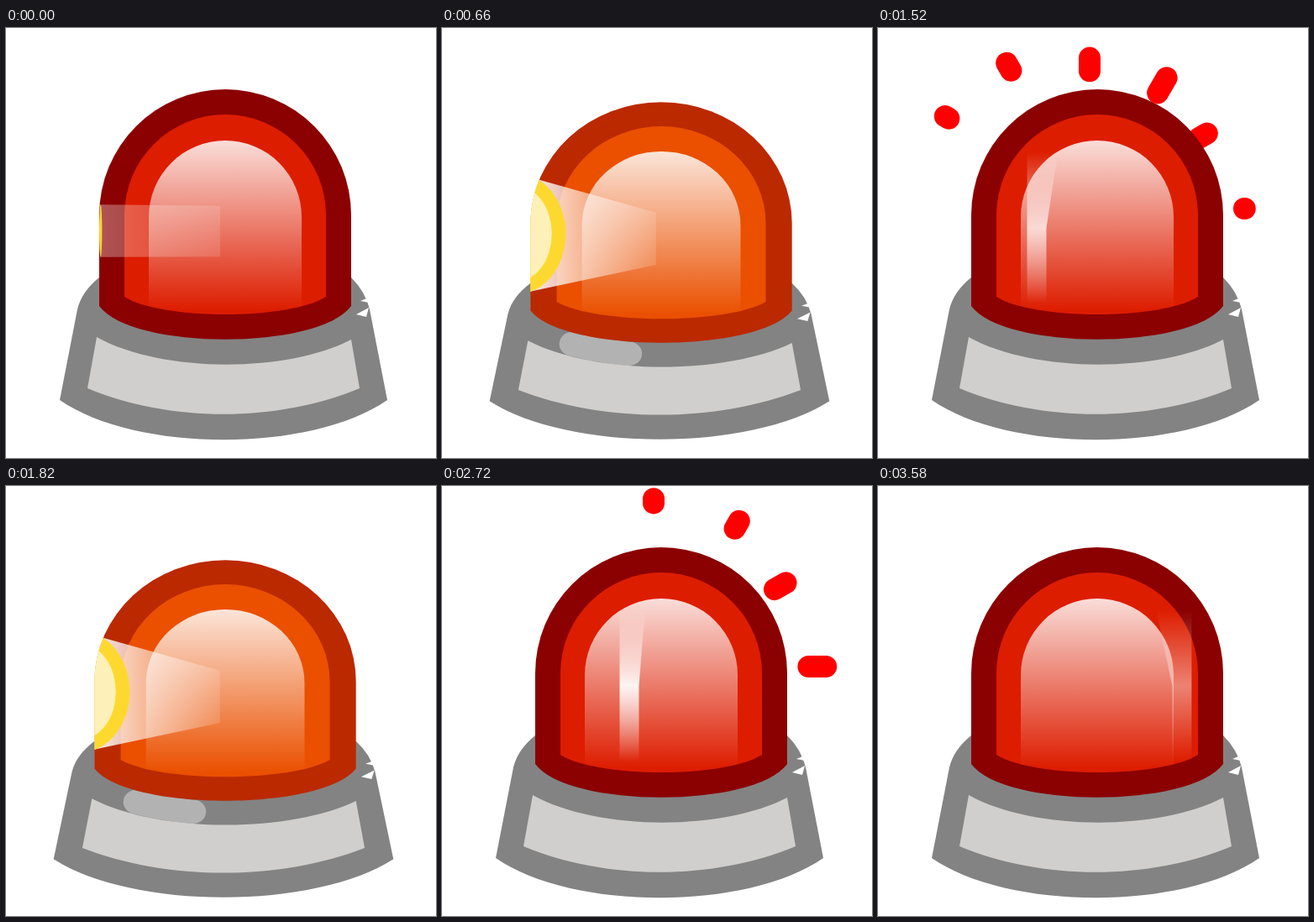
Write an HTML page with a canvas that moves like this. It is 512 px wide and 512 px high and loops after 3.6 s.

```html
<!DOCTYPE html>
<html>
<head>
<meta charset="utf-8">
<style>
  html, body { margin: 0; overflow: hidden; background: #fff; }
  canvas { display: block; }
</style>
</head>
<body>
<canvas id="stage" width="512" height="512"></canvas>
<script>
const ctx = document.getElementById('stage').getContext('2d');
const TURN = 29, LAST = 5, FRAMES = 180, FRAME_MS = 20;

const base = new Path2D('M111 297Q90 314 85 335L64 443C155 506 363 506 454 443L433 335Q428 314 411 297Z');
const plate = new Path2D('M108 368C185 411 334 411 411 371L421 429C323 470 195 470 97 429Z');
const chips = new Path2D('M417 341L432 333L429 344ZM422 325L429 322L432 327Z');
const glass = new Path2D('M111 331V223A150 150 0 0 1 411 223V331C372 384 150 384 111 331Z');
const body = new Path2D('M141 320V223A120 120 0 0 1 381 223V320C337 348 185 348 141 320Z');
const core = new Path2D('M170 332V225A91 91 0 0 1 352 225V332C300 344 222 344 170 332Z');

// End point and direction of each ray, from left to right
const rightRays = [[364, 24, .5, -.866], [436, 100, .866, -.5], [498, 215, 1, 0]];
const leftRays = rightRays.map(([x, y, dx, dy]) => [507 - x, y, -dx, dy]).reverse();
const rays = [...leftRays, [252, 5, 0, -1], ...rightRays];

const clamp = v => Math.max(0, Math.min(1, v));
const smooth = v => { v = clamp(v); return v * v * (3 - 2 * v); };
const white = a => `rgba(255,255,255,${a})`;
const blend = (a, b, t) => `rgb(${a.map((v, i) => Math.round(v + (b[i] - v) * t))})`;

function fill(path, style) {
  ctx.fillStyle = style;
  ctx.fill(path);
}

function gradient(x0, y0, x1, y1, ...alphas) {
  const g = ctx.createLinearGradient(x0, y0, x1, y1);
  alphas.forEach((a, i) => g.addColorStop(i / (alphas.length - 1), white(a)));
  return g;
}

function polygon(points, style) {
  ctx.beginPath();
  points.forEach(([x, y]) => ctx.lineTo(x, y));
  ctx.fillStyle = style;
  ctx.fill();
}

function ellipse(x, y, rx, ry, style) {
  if (rx <= 0 || ry <= 0) return;
  ctx.beginPath();
  ctx.ellipse(x, y, rx, ry, 0, 0, 7);
  ctx.fillStyle = style;
  ctx.fill();
}

function drawRays(p) {
  ctx.strokeStyle = '#f00';
  ctx.lineWidth = 26;
  rays.forEach(([x, y, dx, dy], i) => {
    const left = 18 + i - p;
    const outer = Math.min(62, 10.2 * left), inner = Math.min(62, 15.4 * left);
    if (left <= 0 || inner <= outer) return;
    ctx.beginPath();
    ctx.moveTo(x - dx * inner, y - dy * inner);
    ctx.lineTo(x - dx * outer, y - dy * outer);
    ctx.stroke();
  });
}

function drawBaseGlint(p) {
  const half = 32.5 * clamp(Math.min(p - 1, 14.5 - p) / 2);
  if (half <= 0) return;
  const mid = 191.5 + 18 * (p - 4);
  ctx.strokeStyle = '#b2b2b2';
  ctx.lineWidth = 30;
  ctx.beginPath();
  for (let i = -4; i <= 4; i++) {
    const x = mid + half * i / 4;
    ctx.lineTo(x, 386 - 14 * ((x - 260) / 102) ** 2);
  }
  ctx.stroke();
}

function drawShine(p) {
  const x = 223 + 17 * (p - 20);
  const alpha = 1 - ((x - 261) / 136) ** 2;
  if (alpha <= 0) return;
  const bulge = (261 - x) * .19, l = x - 11.5, r = x + 11.5;
  polygon([
    [l + Math.min(0, bulge), 148], [r + Math.max(0, bulge), 148],
    [r, 238], [r, 328], [l, 328], [l, 238]
  ], gradient(0, 148, 0, 328, 0, alpha, 0));
}

function drawReflector(p) {
  const angle = (3 + 11.5 * p) * Math.PI / 180;
  if (angle >= Math.PI) return;
  const s = Math.sin(angle);
  const x = 255 - 142 * Math.cos(angle) * (1 + 1.26 * s * s), y = 242 - 8 * s;
  const ry = 28 + 62 * s, rx = ry * s, near = 30 + 3 * s;
  const alpha = .28 + .72 * clamp(s / .75);
  polygon([[255, 242 - near], [x, y - ry], [x, y + ry], [255, 242 + near]],
    gradient(x, 0, 255, 0, alpha, .13));
  ellipse(x, y, rx, ry, '#fdd92f');
  ellipse(x, y, rx - 16, ry - 16, '#fdf0b8');
}

function draw(frame) {
  const turn = Math.min(LAST, Math.floor(frame / TURN));
  const start = turn * TURN;
  const p = (frame - start) * (turn === LAST ? TURN / (FRAMES - start) : 1);
  const pulse = p < 4 ? smooth(p / 4) : 1 - smooth((p - 4) / 13);
  const squash = .0375 * pulse * (turn % 2 ? 1 : -1);
  const heat = p < 4 ? smooth(p / 4) : 1 - smooth((p - 11) / 5);

  ctx.fillStyle = '#fff';
  ctx.fillRect(0, 0, 512, 512);
  ctx.lineCap = ctx.lineJoin = 'round';
  drawRays(p);

  ctx.save();
  ctx.translate(259.5, 479);
  ctx.scale(1 + squash, 1 - squash);
  ctx.translate(-259.5, -479);
  fill(base, '#838383');
  drawBaseGlint(p);
  fill(plate, '#d0cfcd');
  fill(chips, '#fff');
  fill(glass, blend([139, 0, 0], [187, 41, 0], heat));
  fill(body, blend([221, 29, 0], [234, 80, 0], heat));
  fill(core, gradient(0, 134, 0, 336, .85, 0));
  ctx.clip(glass);
  drawShine(p);
  drawReflector(p);
  ctx.restore();
}

function tick() {
  draw(Math.floor(performance.now() / FRAME_MS) % FRAMES);
  requestAnimationFrame(tick);
}
tick();
</script>
</body>
</html>
```
